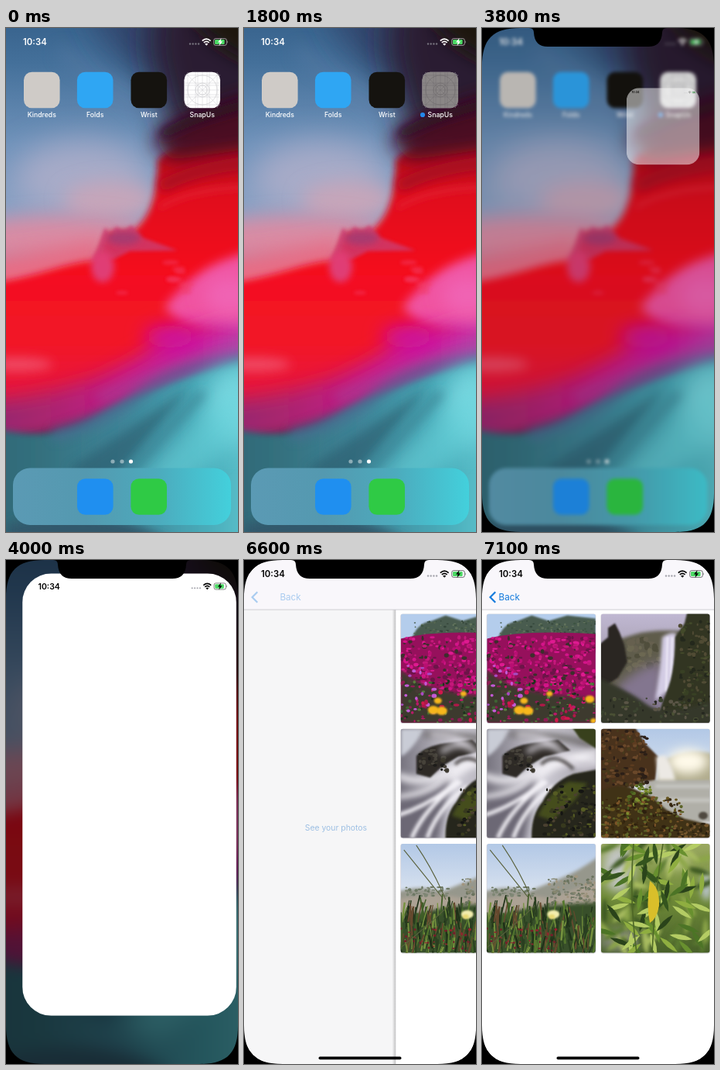
Recreate the animation shown at these times as an HTML page. Size 300 by 650 pixels, loop 8000 ms.

```html
<!DOCTYPE html>
<html lang="en">
<head>
<meta charset="utf-8">
<title>Opening a photo app</title>
<style>
html, body { margin: 0; width: 100%; height: 100%; overflow: hidden; background: #000; }
svg { display: block; font-family: Inter, Roboto, sans-serif; }
#stage { width: 100vw; height: 100vh; }
</style>
</head>
<body>
<svg id="stage" viewBox="0 0 300 650" preserveAspectRatio="none"></svg>
<script>
const LOOP = 8000, STEP = 100;
const stage = document.getElementById('stage');

let seed = 7;
const rand = (a = 0, b = 1) => {
  seed = (seed * 16807) % 2147483647;
  return a + (b - a) * seed / 2147483647;
};
const pick = list => list[Math.floor(rand(0, list.length))];
const repeat = (n, make) => Array.from({ length: n }, (_, i) => make(i)).join('');

const soft = blur => blur ? `filter="url(#b${blur})"` : '';
const shape = (d, fill, blur = 0, extra = '') => `<path d="${d}" fill="${fill}" ${soft(blur)} ${extra}/>`;
const oval = (x, y, rx, ry, fill, blur = 0, extra = '') =>
  `<ellipse cx="${x}" cy="${y}" rx="${rx}" ry="${ry}" fill="${fill}" ${soft(blur)} ${extra}/>`;
const box = (x, y, w, h, fill, r = 0, extra = '') =>
  `<rect x="${x}" y="${y}" width="${w}" height="${h}" rx="${r}" fill="${fill}" ${extra}/>`;
const stroke = (d, color, width = 1, blur = 0, extra = '') =>
  `<path d="${d}" fill="none" stroke="${color}" stroke-width="${width}" ${soft(blur)} ${extra}/>`;
const text = (x, y, size, weight, fill, str, extra = '') =>
  `<text x="${x}" y="${y}" font-size="${size}" font-weight="${weight}" fill="${fill}" ${extra}>${str}</text>`;
const gradient = (id, dir, ...colors) =>
  `<linearGradient id="${id}" x2="${dir === 'x' ? 1 : 0}" y2="${dir === 'y' ? 1 : 0}">` +
  colors.map((c, i) => `<stop offset="${i / (colors.length - 1)}" stop-color="${c}"/>`).join('') +
  '</linearGradient>';
const blurFilter = n =>
  `<filter id="b${n}" x="-60" y="-60" width="420" height="780" filterUnits="userSpaceOnUse"><feGaussianBlur stdDeviation="${n}"/></filter>`;

const defs = '<defs>' + [1, 2, 4, 7, 12, 20].map(blurFilter).join('') +
  gradient('air', 'y', '#2c5680', '#44709a', '#6f92ba', '#8ea4c6', '#a9a6c2') +
  gradient('red', 'y', '#8c0a1c', '#e0101f', '#f4101f', '#f21428', '#e01a48') +
  gradient('violet', 'x', '#8a2a70', '#a8266e', '#c41a86', '#cc1ca0', '#b85cc0') +
  gradient('sea', 'x', '#2d6472', '#34707e', '#3f8598', '#48aab8', '#68d2da') +
  gradient('dock', 'x', '#5b9ab4', '#5499b0', '#4cabbd', '#43d0dc') +
  gradient('sky', 'y', '#b2c8e6', '#dde5f0', '#f0f0f2') +
  gradient('dusk', 'y', '#c0b8d2', '#a098a8', '#857d92') +
  gradient('silk', 'x', '#77747f', '#cfcdd6', '#9f9ba4') +
  gradient('lawn', 'y', '#9aa860', '#6f8a38', '#48602a') +
  gradient('edge', 'x', 'rgba(0,0,0,0)', 'rgba(0,0,0,.22)') +
  '<clipPath id="round"><rect width="140.5" height="140.5" rx="3"/></clipPath>' +
  '<clipPath id="frame"><rect id="frameBox"/></clipPath></defs>';

const wallpaper = box(-60, -60, 420, 420, 'url(#air)') +
  shape('M90-60H220L240 70Q170 70 130 20Z', '#31466e', 20) +
  shape('M195-60H360V140L215 140Q195 80 185 20Z', '#2a1b30', 20) +
  shape('M245-60H360V60Q290 40 250 0Z', '#1b1210', 12) +
  stroke('M70 30Q150 80 205 128', '#6682ac', 10, 12, 'opacity=".6"') +
  oval(100, 195, 90, 50, '#a7abc8', 20) +
  oval(135, 222, 60, 24, '#c6a6ba', 12) +
  oval(70, 272, 130, 30, '#d88ca4', 12) +
  shape('M-60 298Q60 286 125 272V350H-60Z', '#e86c84', 12) +
  shape('M360 120C270 132 215 148 196 170C195 212 190 240 165 262L132 264L118 300C70 302 40 326 -60 334V500C60 520 180 450 360 420Z', 'url(#red)', 4) +
  shape('M360 70L225 118L188 146L215 170L360 150Z', '#4a0a20', 12) +
  stroke('M200 138Q250 112 320 96', '#2c0c20', 12, 7) +
  stroke('M200 205Q250 178 330 172', '#a80c20', 16, 7) +
  stroke('M198 232Q240 205 330 205', '#e42034', 5, 4) +
  shape('M112 300L128 257L136 268L142 256L152 262L162 254L176 270L222 287L160 288L140 298Z', '#cc3c70', 2, 'opacity=".8"') +
  oval(125, 308, 15, 20, '#e03c74', 4) + oval(152, 271, 22, 9, '#a83a70', 4) +
  oval(15, 434, 45, 9, '#f04864', 7) +
  shape('M360 280C270 292 236 322 205 360C230 392 270 392 360 400Z', '#f052a0', 7) +
  repeat(9, () => oval(rand(150, 240), rand(300, 345), rand(6, 13), rand(2, 4), '#f23c66', 2, 'opacity=".5"')) +
  shape('M360 385C280 370 220 385 185 415C120 455 60 478 -60 485V540C80 550 160 480 360 430Z', 'url(#violet)', 12) +
  oval(212, 398, 34, 14, '#cc10a0', 12) + oval(290, 345, 34, 26, '#f064b4', 12) +
  stroke('M120 478Q200 440 310 402', '#a04a98', 9, 7, 'opacity=".7"') +
  shape('M-60 500C20 535 70 525 110 505S200 450 360 410V710H-60Z', 'url(#sea)', 4) +
  stroke('M60 525Q120 510 170 474T320 422', '#4b6a92', 16, 7, 'opacity=".75"') +
  oval(295, 485, 30, 45, '#86e0e8', 20) +
  shape('M150 600L310 445V520L200 620Z', '#66d2da', 12, 'opacity=".6"') +
  shape('M80 570L240 462L130 595Z', '#2c5a6c', 7, 'opacity=".6"') +
  stroke('M150 580L255 470', '#3c8898', 9, 7) +
  shape('M0 690V640Q120 610 210 660V700Z', '#30596c', 7);

const statusBar = color =>
  text(22, 22, 11.4, 600, color, '10:34') +
  repeat(4, i => oval(238 + i * 3.7, 20.5, 1.2, 1.2, '#8d8d96', 0, 'opacity=".75"')) +
  stroke('M253.8 16.6Q259.2 11.8 264.6 16.6M255.8 18.9Q259.2 16 262.6 18.9', color, 1.7) +
  shape('M257.1 20.6Q259.2 18.8 261.3 20.6L259.2 22.8Z', color) +
  box(268.7, 13.6, 16.6, 8.8, 'none', 2.4, `stroke="${color}" stroke-opacity=".6" stroke-width=".9"`) +
  box(270, 15, 12.6, 6, '#4cd964', 1.2) +
  shape('M286.3 16.5q1.7 1.5 0 3z', color, 0, 'opacity=".6"') +
  shape('M278.5 13l-4.6 5.6h2.6l-1 4.4 4.6-5.7h-2.6z', color);

const tile = (cx, cy, fill) => box(cx - 23.3, cy - 23.3, 46.6, 46.6, fill, 10.5);
const app = (cx, fill, name) => tile(cx, 80, fill) +
  text(cx, 115, 8.7, 500, '#fff', name, 'text-anchor="middle"');

const gridIcon = [6, 9, 19].map(r =>
    `<circle cx="254" cy="80" r="${r}" fill="none" stroke="#c3c3c6" stroke-width=".6"/>`).join('') +
  stroke([-19, -9, -6, 0, 6, 9, 19].map(o => `M${254 + o} 57v46M231 ${80 + o}h46`).join('') +
    'M233 59l42 42M275 59l-42 42', '#cfcfd2', .5);

const home = `<g id="home">${wallpaper}
  <g id="homeTop">${statusBar('#fff')}
    ${app(46.3, '#cfcbc7', 'Kindreds')}${app(115.2, '#2fa6f3', 'Folds')}
    ${app(184.8, '#15130f', 'Wrist')}${app(253.7, '#fff', 'SnapUs')}${gridIcon}
    <g id="shade">${tile(253.7, 80, '#0c0404')}</g>
    ${oval(231, 112, 3.1, 3.1, '#2488ea', 0, 'id="newDot"')}
    ${[138, 150, 161.5].map((x, i) => oval(x, 559, 2.6, 2.6, '#fff', 0, `opacity="${i < 2 ? .45 : 1}"`)).join('')}
    ${box(9, 567.5, 282, 73.5, 'url(#dock)', 22)}
    ${tile(115.3, 604.5, '#1f8ff0')}${tile(184.7, 604.5, '#2fca45')}
  </g></g><rect id="dim" width="300" height="650"/>`;

const dots = (n, colors, x0, x1, y0, y1, r0, r1) => repeat(n, () =>
  oval(rand(x0, x1).toFixed(1), rand(y0, y1).toFixed(1), rand(r0, r1), rand(r0, r1) * .8, pick(colors)));
const blades = (n, colors, y0, y1, len) => repeat(n, () => {
  const x = rand(0, 140), y = rand(y0, y1);
  return stroke(`M${x} ${y}l${rand(-6, 8)} ${-rand(len / 2, len)}`, pick(colors), rand(1, 2.6));
});

const flowers = () => box(0, 0, 141, 141, '#b4cdec') +
  shape('M12 40Q18 12 40 9L58 2L80 9L104 2L141 6V50H12Z', '#4a5c50', 1) +
  dots(110, ['#34463a', '#64755e', '#3e5442', '#566850'], 18, 141, 9, 28, .8, 2) +
  shape('M0 32Q45 20 141 26V141H0Z', '#96105c') +
  dots(330, ['#d4148a', '#de1a90', '#b80f72', '#c4187a', '#6c1448', '#3c2f2c'], 0, 140, 30, 102, 1.2, 3.6) +
  shape('M0 72Q20 92 60 100T141 108V141H0Z', '#2d4227', 2, 'opacity=".85"') +
  dots(130, ['#3f6434', '#1e321d', '#577b3d', '#8c1c54', '#b81a68'], 0, 140, 86, 140, 1, 3) +
  dots(18, ['#c25ad6', '#a74cc4'], 0, 45, 66, 128, 1.6, 3.4) +
  dots(16, ['#d0184c', '#b01848'], 20, 140, 100, 138, 1.5, 4) +
  [[48, 112, 5], [42, 124, 7], [53, 125, 7], [81, 103, 4], [133, 110, 6], [138, 138, 4]]
    .map(([x, y, r]) => oval(x, y, r, r * .8, '#f7b71c', 1)).join('');

const waterfall = () => box(0, 0, 141, 141, 'url(#dusk)') +
  shape('M0 40Q25 32 45 26T105 22V100H0Z', '#5f5c4c', 2) +
  dots(40, ['#504e3c', '#6c6852', '#66604f'], 34, 76, 32, 72, 2, 6) +
  shape('M20 95Q50 66 80 62V125H20Z', '#83768f', 7) +
  shape('M79 30Q90 23 97 25L95 92L70 112L76 70Z', '#d3cce4', 2) +
  stroke('M86 30L84 100M92 30L90 90', '#ece8f6', 2.5, 1) +
  shape('M-5 42L9 30L9 18L18 12L24 24L30 40L34 62L22 82L-5 100Z', '#2a2523', 1) +
  shape('M96 30L108 12L112-5H145V145H70L80 112Q96 80 96 30Z', '#303522', 1) +
  dots(110, ['#434a2a', '#24281c', '#504b34', '#384024'], 102, 141, 8, 125, 1, 3.5) +
  shape('M-5 82Q35 98 58 116T145 112V145H-5Z', '#35372a', 2) +
  dots(90, ['#4a5034', '#25271f', '#5a5546', '#3c4430'], 0, 140, 108, 141, 1, 3.2);

const stream = () => box(0, 0, 141, 141, 'url(#silk)') +
  shape('M0 0H30Q15 28 0 36Z', '#c9ccd6', 2) +
  stroke('M30 8Q80 4 140 22', '#5c5856', 6, 4) +
  stroke('M-5 60Q30 75 60 55T145 30M-5 90Q40 85 70 60T145 42', '#f0eef3', 8, 4) +
  shape('M20 35Q32 22 60 18L92 14L108 28L74 36L54 48L38 63L20 58Z', '#2d2b28', 1) +
  dots(30, ['#1d1c1a', '#46423a', '#3a372c'], 24, 60, 26, 54, 1, 4) +
  shape('M108-5H145V28L120 12Z', '#38411f', 1) +
  stroke('M52 30Q80 10 100 34T145 42M38 8Q68 6 92 24', '#d9d5de', 6, 4) +
  stroke('M70 46Q88 28 112 52', '#45413f', 4, 2) +
  shape('M-5 92Q40 90 64 64L48 145H-5Z', '#6c6875', 4) +
  stroke('M-5 112Q40 98 74 66M14 141Q32 100 78 68M34 141Q48 102 86 74', '#f2f0f5', 5, 2) +
  shape('M58 145Q56 112 72 94Q85 68 112 58L145 52V145Z', '#27271a', 1) +
  shape('M66 112Q80 82 106 68L130 70L114 92L84 118Z', '#454d1e', 2) +
  dots(110, ['#1c1c16', '#565c24', '#37391e', '#4a4030', '#141412'], 74, 141, 72, 140, 1, 3.6);

const lagoon = () => box(0, 0, 141, 141, 'url(#sky)') +
  shape('M76 44Q110 24 145 32V76H72Z', '#b0ab8c', 2) +
  oval(112, 42, 26, 16, '#fffaea', 7) +
  shape('M60 66H145V120H40Z', '#b0afa8', 1) +
  stroke('M70 74H145M76 92H145', '#d4d4d0', 3, 2) +
  shape('M-5-5H42L58 20L74 36L70 66L46 70L-5 98Z', '#48311d', 1) +
  dots(150, ['#2c1f17', '#6a482a', '#473a1c', '#5c3c20'], 0, 60, 2, 76, 1, 3.6) +
  shape('M71 36L82 34Q92 45 96 66H74Z', '#ece9e4', 2) +
  shape('M-5 82Q24 68 44 78L66 88L84 104L108 116L145 124V145H-5Z', '#413018', 1) +
  dots(230, ['#66551f', '#2c1f0e', '#7c5428', '#5c6428', '#38280f'], 0, 105, 88, 141, 1, 3.2) +
  dots(50, ['#5d4425', '#2c200f', '#76562c'], 95, 141, 122, 141, 1, 3) +
  dots(45, ['#7d8e2e', '#566b24', '#46581e'], 32, 64, 72, 116, 1, 3) +
  oval(132, 112, 6, 5, '#4f4a40', 1);

const meadow = () => box(0, 0, 141, 141, 'url(#sky)') +
  shape('M-5 62Q28 52 52 62L92 46Q118 36 145 16V110H-5Z', '#96978c', 2) +
  shape('M-5 72Q40 62 80 70L145 48V110H-5Z', '#aca294', 2) +
  dots(130, ['#6a735e', '#86866f', '#a1957f', '#7b8070'], 80, 141, 42, 80, .8, 2.6) +
  dots(45, ['#6d7864', '#7f8775'], 4, 62, 56, 68, .8, 3) +
  shape('M-5 98Q50 78 145 76V145H-5Z', '#38502a', 2) +
  blades(230, ['#56782e', '#2a3f20', '#76923e', '#405f28', '#66492e', '#1f3018'], 92, 148, 28) +
  dots(40, ['#93242e', '#741f2a'], 0, 90, 108, 138, .8, 2.2) +
  stroke('M4 8Q30 40 54 70M20 2Q42 34 58 72M0 134Q30 110 62 80', '#59613c', 1.1) +
  oval(86, 91, 8, 5.5, '#f3edae', 1) + oval(84, 94, 4, 3, '#e8d873', 1);

const leafCluster = (n, colors, size, blur) => `<g ${soft(blur)}>` + repeat(n, () => {
  const x = rand(0, 140), y = rand(0, 140);
  return shape(`M0 ${-size}Q${size * .42} 0 0 ${size}Q${-size * .42} 0 0 ${-size}Z`, pick(colors), 0,
    `transform="translate(${x} ${y}) rotate(${rand(-80, 80)})"`);
}) + '</g>';
const leaves = () => box(0, 0, 141, 141, 'url(#lawn)') +
  oval(22, 32, 20, 30, '#c3c6c4', 7) + oval(136, 55, 6, 18, '#bfc8d6', 4) +
  oval(25, 124, 28, 14, '#85887c', 7) + oval(95, 20, 18, 12, '#c6d28c', 7) +
  leafCluster(45, ['#5c7c30', '#a8bc60', '#3c5824', '#8ca648'], 18, 2) +
  leafCluster(75, ['#4c7426', '#8fae40', '#34541e', '#b4cc64', '#68902f', '#2a431a'], 15, 0) +
  stroke('M42 0Q36 70 46 141M80 0Q70 60 66 141', '#4d6626', 1.6) +
  shape('M63 48Q76 56 75 80Q72 97 63 102Q58 80 63 48Z', '#d9bf2a');

const photos = [flowers, waterfall, stream, lagoon, meadow, leaves].map((draw, i) => {
  const x = i % 2 ? 154 : 6.3, y = 69.5 + 148.2 * Math.floor(i / 2);
  return `<g transform="translate(${x} ${y})">${box(-.5, 0, 141.5, 141.5, '#d5d3d8', 3)}
    <g clip-path="url(#round)">${draw()}</g></g>`;
}).join('');

const BLUE = '#147bdc';
const windowLayer = `<g id="window" clip-path="url(#frame)"><rect id="sheet" fill="#fff"/>
  <g id="content">
    <g id="menu">
      <g id="menuPage">${text(150, 348.8, 10.4, 400, '#1a72cc', 'See your photos', 'id="link" text-anchor="middle"')}</g>
      <rect id="menuDim" width="300" height="650" fill="#100030"/>
      <g id="gallery">${box(-5, 0, 5, 650, 'url(#edge)')}${box(0, 0, 300, 650, '#fff')}${photos}</g>
      ${box(0, 0, 300, 64, '#f9f7fb')}${box(0, 63.6, 300, .9, '#c9c7cd')}
      <g id="back">${stroke('M17.3 41.2L10.6 48L17.3 54.8', BLUE, 2.2)}
        ${text(21.5, 52.2, 11.7, 400, BLUE, 'Back', 'id="backLabel"')}</g>
    </g>
    ${statusBar('#000')}${box(96.5, 640.6, 107, 3.6, '#000', 1.8)}
  </g></g>`;

const corner = (x, y, sx, sy) =>
  shape('M-1-1H50V0C14 0 0 14 0 50H-1Z', '#000', 0, `transform="translate(${x} ${y}) scale(${sx} ${sy})"`);
const bezel = `<g id="bezel">
  ${corner(0, 0, 1, 1)}${corner(300, 0, -1, 1)}${corner(0, 650, 1, -1)}${corner(300, 650, -1, -1)}
  ${shape('M61 0Q67 0 67 6Q68 24 85 24H215Q232 24 233 6Q233 0 239 0Z', '#000')}</g>`;

stage.innerHTML = defs + home + windowLayer + bezel;

const el = {};
stage.querySelectorAll('[id]').forEach(node => { el[node.id] = node; });
const set = (id, attrs) => Object.entries(attrs).forEach(([k, v]) => el[id].setAttribute(k, v));
const show = (id, on) => { el[id].style.display = on ? '' : 'none'; };
const mix = (a, b, p) => a + (b - a) * p;
const ramp = (t, from, to) => Math.min(1, Math.max(0, (t - from) / (to - from)));
const spring = (ms, rate) => {
  const x = Math.max(0, ms) / 1000 * rate;
  return 1 - (1 + x) * Math.exp(-x);
};

function render(t) {
  // Icon is shaded while the app installs, then almost clears.
  set('shade', { opacity: .48 * ramp(t, 1300, 1700) - .41 * ramp(t, 1900, 2500) });
  set('newDot', { opacity: ramp(t, 1300, 1700) });

  // The window grows out of the icon.
  const opening = t >= 3800;
  const open = t >= 4600 ? 1 : opening ? spring(t - 3750, 16) : 0;
  show('home', open < 1);
  show('window', opening);
  show('bezel', opening);
  el.home.style.filter = opening ? `blur(${10 * open}px)` : 'none';
  set('homeTop', { opacity: 1 - ramp(open, .2, .9) });
  set('dim', { opacity: .55 * open });

  const width = mix(46, 300, open), height = mix(46, 650, open ** 1.47);
  const x = mix(254, 150, open) - width / 2, y = mix(80, 325, open) - height / 2;
  const rect = { x, y, width, height };
  set('sheet', rect);
  set('frameBox', { ...rect, rx: mix(11, 40, open) });
  set('window', { opacity: ramp(t, 3700, 3900) });
  set('content', { transform: `translate(${x} ${y}) scale(${width / 300})` });
  set('menu', { opacity: ramp(t, 4800, 5300) });

  // Gallery is pushed in over the menu.
  const push = t >= 7100 ? 1 : Math.min(1, spring(t - 6490, 11) / .988);
  set('link', { opacity: t >= 6300 ? .4 : 1 });
  set('menuPage', { transform: `translate(${-90 * push} 0)` });
  set('menuDim', { opacity: .1 * push });
  set('gallery', { transform: `translate(${300 * (1 - push)} 0)` });
  show('gallery', push > 0);
  set('back', { opacity: push });
  set('backLabel', { x: 21.5 + 38 * (1 - push) });
}

const start = performance.now();
function tick() {
  const t = (performance.now() - start) % LOOP;
  render(Math.floor(t / STEP) * STEP);
  requestAnimationFrame(tick);
}
tick();
</script>
</body>
</html>
```
